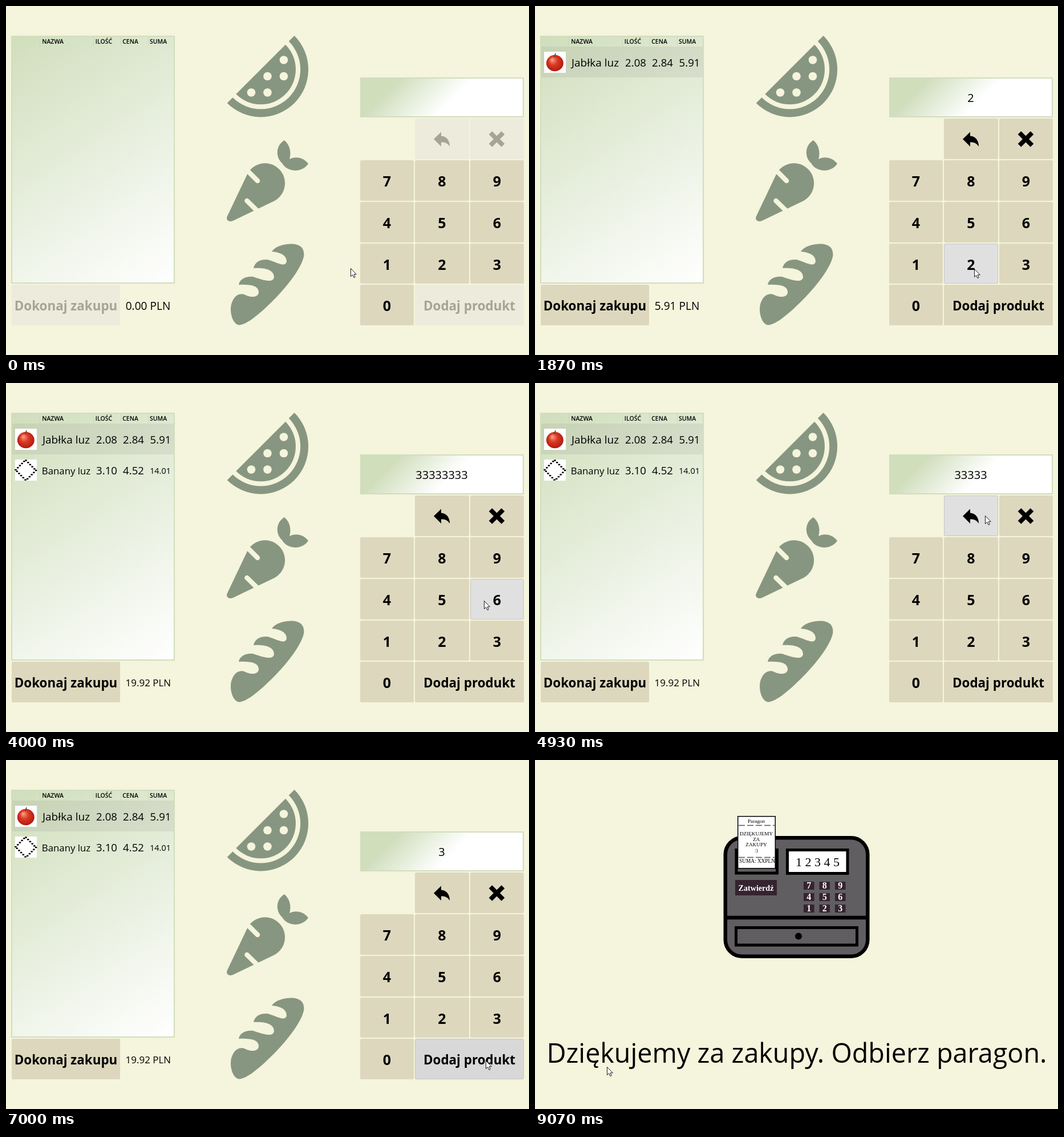
An HTML page with a canvas for the animation above (9600 ms loop, 917 by 611 pixels).

```html
<!DOCTYPE html>
<html lang="pl">
<head>
<meta charset="utf-8">
<title>Kasa samoobsługowa</title>
<style>
html, body { margin: 0; width: 100%; height: 100%; overflow: hidden; background: #f5f4dc; }
canvas { display: block; }
</style>
</head>
<body>
<canvas id="stage" width="917" height="611"></canvas>
<script>
const ctx = document.getElementById('stage').getContext('2d');
const LOOP = 9600, STEP = 1000 / 15, THANKS = 9000;
const SANS = '"Open Sans", "Noto Sans", sans-serif';
const SERIF = '"Liberation Serif", "Noto Serif", serif';
const BG = '#f5f4dc', GREEN = '#d0debc', LEAF = '#879680', KEY = '#ddd8bd', PALE = '#ecebdc';
const FADED = '#a4a597', HOVER = '#e0e0e0', PRESSED = '#d8d8d8', PLUM = '#35232f';

// Cursor stops: time, x, y
const moves = [
  [0, 604, 459], [67, 604, 459], [333, 671, 456], [800, 671, 456], [1200, 768, 515],
  [1400, 768, 515], [1735, 770, 460], [1870, 770, 460], [2133, 790, 512], [2270, 790, 512],
  [2735, 867, 466], [3270, 867, 466], [3335, 866, 465], [3735, 866, 465], [4400, 787, 231],
  [4530, 787, 231], [4870, 789, 232], [4935, 789, 232], [5133, 852, 236], [5600, 852, 236],
  [6000, 852, 284], [6270, 858, 458], [6335, 858, 458], [6600, 846, 520], [6935, 841, 526],
  [7000, 841, 526], [7600, 140, 536], [7733, 126, 536], [7925, 126, 536], [7930, 135, 534],
  [8266, 135, 534], [8400, 131, 530], [9060, 131, 530], [9066, 126, 537]
];

// Contents of the code field
const entries = [
  [0, ''], [730, '1'], [1400, ''], [1800, '2'], [2270, ''], [2800, '3'], [2930, '33'],
  [3070, '333'], [3200, '3333'], [3270, '33333'], [3470, '333333'], [3600, '3333333'],
  [3730, '33333333'], [4530, '3333333'], [4730, '333333'], [4930, '33333'],
  [5670, ''], [6330, '3'], [7070, '']
];

const COLS = [621, 717, 814], ROWS = [197, 270, 343, 416, 488];
const buttons = [];
'789456123'.split('').forEach((label, i) => addButton(label, COLS[i % 3], ROWS[1 + Math.floor(i / 3)]));
addButton('0', COLS[0], ROWS[4]);
addButton('undo', COLS[1], ROWS[0], 95, 'typed');
addButton('clear', COLS[2], ROWS[0], 94, 'typed');
addButton('Dodaj produkt', COLS[1], ROWS[4], 191, 'typed');
addButton('Dokonaj zakupu', 10, ROWS[4], 190, 'filled');

function addButton(label, x, y, w = x === COLS[1] ? 95 : 94, needs = '') {
  buttons.push({ label, x, y, w, h: y === ROWS[3] ? 70 : 71, needs });
}

function cursorAt(t) {
  const i = moves.findIndex(m => m[0] > t);
  if (i < 0) return moves[moves.length - 1].slice(1);
  const [t0, x0, y0] = moves[i - 1], [t1, x1, y1] = moves[i];
  const u = (t - t0) / (t1 - t0), k = u * u * (3 - 2 * u);
  return [x0 + (x1 - x0) * k, y0 + (y1 - y0) * k];
}

function entryAt(t) {
  let value = '';
  for (const [at, text] of entries) if (t >= at) value = text;
  return value;
}

function rect(x, y, w, h, fill) {
  ctx.fillStyle = fill;
  ctx.fillRect(x, y, w, h);
}

function frame(x, y, w, h, color, width) {
  ctx.strokeStyle = color;
  ctx.lineWidth = width;
  ctx.strokeRect(x, y, w, h);
}

function disc(x, y, r, fill) {
  ctx.fillStyle = fill;
  ctx.beginPath();
  ctx.arc(x, y, r, 0, 7);
  ctx.fill();
}

function line(x0, y0, x1, y1, color, width, cap = 'butt') {
  ctx.strokeStyle = color;
  ctx.lineWidth = width;
  ctx.lineCap = cap;
  ctx.beginPath();
  ctx.moveTo(x0, y0);
  ctx.lineTo(x1, y1);
  ctx.stroke();
}

function text(str, x, y, size, color = '#000', font = SANS, weight = 400) {
  ctx.font = `${weight} ${size}px ${font}`;
  ctx.textAlign = 'center';
  ctx.fillStyle = color;
  ctx.fillText(str, x, y);
}

function gradient(x0, y0, x1, y1, ...stops) {
  const g = ctx.createLinearGradient(x0, y0, x1, y1);
  stops.forEach(([at, color]) => g.addColorStop(at, color));
  return g;
}

const shape = d => new Path2D(d);
const LEAVES = shape('M488 235C472 245 473 265 484 275C492 290 518 294 530 276C521 264 506 263 497 268C501 256 497 242 488 235Z');
const CARROT = shape('M388 368L424 292.5A35 35 0 1 1 471 341L398 376C390 379 385 374 388 368Z');
const BREAD = shape('M397 517C402 505 412 502 420 506C432 512 444 509 443 500C442 490 430 487 408 488C410 478 420 473 433 474' +
  'C446 478 468 487 470 475C470 462 455 458 434 459C436 449 445 443 458 444C470 446 490 460 492 447C492 436 480 431 466 430' +
  'C472 420 490 416 503 416.5C517 418 522.5 424 522.5 436C520 456 495 488 473 511C453 531 427 556 410 558.5C396 559 390 530 397 517Z');
const UNDO = shape('M750 233L763 220.5V227.5C773 228 778 236 778 246C774 240 770 238.5 763 238.5V246Z');
const POINTER = shape('M.5 .5V14.5L3.7 11.5L6 16.5L8.2 15.5L6 10.8H10.3Z');

function drawMelon() {
  const a = -Math.PI / 4, b = a + Math.PI;
  ctx.fillStyle = LEAF;
  ctx.beginPath();
  ctx.arc(446.7, 111, 83.4, a, b);
  ctx.arc(446.7, 111, 69.5, b, a, true);
  ctx.fill();
  ctx.beginPath();
  ctx.arc(446.7, 111, 61.3, a, b);
  ctx.fill();
  for (const [c, r] of [[2, 0], [1, 1], [2, 1], [0, 2], [1, 2]]) {
    disc(430 + c * 28.5, 94.5 + r * 28.5, 7.3, BG);
  }
}

function drawPictures() {
  drawMelon();
  ctx.fillStyle = LEAF;
  ctx.fill(LEAVES);
  ctx.fill(CARROT);
  ctx.fill(BREAD);
  line(420, 285, 441, 306, BG, 8.5, 'round');
  line(422.5, 341, 441, 359, BG, 8.5, 'round');
}

function drawApple() {
  rect(16, 80, 38, 37, '#fff');
  const g = ctx.createRadialGradient(30, 94, 1, 35, 99, 17);
  [[0, '#f59a80'], [0.4, '#dd3a24'], [1, '#a8160f']].forEach(s => g.addColorStop(...s));
  ctx.fillStyle = g;
  ctx.beginPath();
  ctx.ellipse(34.8, 100, 15, 14.3, 0, 0, 7);
  ctx.fill();
  line(34, 89, 36, 83, '#5b3a1e', 1.6);
}

function drawDiamond() {
  rect(16, 134, 38, 37, '#fff');
  for (let i = 0; i < 5; i++) {
    const d = i * 3.7;
    for (const [x, y] of [[35 + d, 135.5 + d], [52.5 - d, 153 + d], [34 - d, 169.5 - d], [17 + d, 152 - d]]) {
      rect(x - 1.7, y - 1.2, 3.4, 2.4, '#000');
    }
  }
}

function drawList(t) {
  rect(10, 53, 285, 432, gradient(10, 53, 295, 485, [0, GREEN], [1, '#fff']));
  [59, 153, 201, 249].forEach(x => rect(x, 54, 1, 17, 'rgba(190,205,180,.5)'));
  [['NAZWA', 82], ['ILOŚĆ', 171.5], ['CENA', 218], ['SUMA', 267]]
    .forEach(([label, x]) => text(label, x, 66, 10.5, '#000', SANS, 600));
  if (t >= 1400) {
    rect(11, 71, 284, 54, 'rgba(120,116,116,.12)');
    drawApple();
    text('Jabłka luz', 105.5, 106, 19);
    [['2.08', 176.5], ['2.84', 223.5], ['5.91', 271]].forEach(([n, x]) => text(n, x, 106, 18.6));
  }
  if (t >= 2270) {
    drawDiamond();
    text('Banany luz', 105.5, 159.5, 16.8);
    text('3.10', 176.5, 160, 18.6);
    text('4.52', 223.5, 160, 18.6);
    text('14.01', 270.5, 158.5, 14.4);
  }
  frame(10, 53, 285, 432, GREEN, 2);
  if (t < 2270) text(t < 1400 ? '0.00 PLN' : '5.91 PLN', 249, 532, 19.1);
  else text('19.92 PLN', 249.3, 531, 17);
}

function drawField(value) {
  rect(621, 125, 287, 70, gradient(621, 125, 799.5, 303.5, [0.2, GREEN], [0.56, '#fff']));
  frame(622, 126, 285, 68, GREEN, 2);
  text(value, 764, 168, 20);
}

function drawButton(b, t, value, [cx, cy]) {
  const enabled = !b.needs || (b.needs === 'typed' ? value !== '' : t >= 1400);
  const over = enabled && cx >= b.x && cx < b.x + b.w && cy >= b.y && cy < b.y + b.h;
  const down = t >= 6930 && t < 7070 || t >= 7930;
  const ink = enabled ? '#000' : FADED;
  ctx.fillStyle = !enabled ? PALE : over ? (down ? PRESSED : HOVER) : KEY;
  ctx.beginPath();
  ctx.roundRect(b.x, b.y, b.w, b.h, 2.5);
  ctx.fill();
  if (over) {
    ctx.strokeStyle = '#c6c6c6';
    ctx.lineWidth = 1;
    ctx.beginPath();
    ctx.roundRect(b.x + 0.5, b.y + 0.5, b.w - 1, b.h - 1, 2.5);
    ctx.stroke();
  }
  const mid = b.x + b.w / 2;
  if (b.label === 'undo') {
    ctx.fillStyle = ink;
    ctx.fill(UNDO);
  } else if (b.label === 'clear') {
    line(849.5, 222, 871.5, 244, ink, 8);
    line(871.5, 222, 849.5, 244, ink, 8);
  } else if (b.label.length > 1) {
    text(b.label, mid, 533, 22.4, ink, SANS, 700);
  } else {
    text(b.label, mid, b.y + 45.5, 25, ink, SANS, 700);
  }
}

function drawShop(t, cursor) {
  const value = entryAt(t);
  drawList(t);
  drawPictures();
  drawField(value);
  buttons.forEach(b => drawButton(b, t, value, cursor));
}

function drawReceipt() {
  rect(355, 98, 67, 92, '#fff');
  frame(355.7, 98.7, 65.6, 91, '#000', 1.5);
  ctx.setLineDash([11, 4]);
  line(357, 114.5, 420, 114.5, '#555', 1.3);
  line(357, 170.5, 420, 170.5, '#555', 1.3);
  ctx.setLineDash([]);
  [['Paragon', 110], ['DZIĘKUJEMY', 132], ['ZA', 141.5], ['ZAKUPY', 151], [':)', 160.5]]
    .forEach(([s, y]) => text(s, 388, y, 9.2, '#000', SERIF));
  text('SUMA: XXPLN', 389.5, 179.5, 9.3, '#000', SERIF);
}

function drawThanks() {
  ctx.fillStyle = '#605e60';
  ctx.strokeStyle = '#000';
  ctx.lineWidth = 6.5;
  ctx.beginPath();
  ctx.roundRect(333.8, 136.3, 249.5, 207.5, 29);
  ctx.fill();
  ctx.stroke();
  line(334, 276, 583, 276, '#000', 6.5);
  frame(352.5, 293.5, 212, 30.5, '#000', 5);
  disc(462, 308.5, 6, '#000');
  frame(353, 157.5, 71.5, 40.5, '#000', 5);
  rect(442, 157, 106, 41, '#fff');
  frame(442.5, 157.5, 105.5, 41, '#000', 5);
  text('1 2 3 4 5', 495.5, 186, 22, '#000', SERIF);
  drawReceipt();
  rect(351, 210, 73, 27, PLUM);
  text('Zatwierdź', 387.5, 228.5, 14.1, '#fff', SERIF, 700);
  '789456123'.split('').forEach((n, i) => {
    const x = 471 + (i % 3) * 27.5, y = 213 + Math.floor(i / 3) * 20;
    rect(x, y, 18.5, 14, PLUM);
    text(n, x + 9.2, y + 12, 16, '#fff', SERIF, 700);
  });
  text('Dziękujemy za zakupy. Odbierz paragon.', 459, 530, 46.7);
}

function drawPointer([x, y]) {
  ctx.save();
  ctx.translate(Math.round(x), Math.round(y));
  ctx.fillStyle = '#fff';
  ctx.strokeStyle = '#1a1a2a';
  ctx.lineWidth = 1;
  ctx.fill(POINTER);
  ctx.stroke(POINTER);
  ctx.restore();
}

function render(ms) {
  const t = Math.floor((ms % LOOP + 4) / STEP) * STEP + 4;
  const cursor = cursorAt(t);
  rect(0, 0, 917, 611, BG);
  if (t >= THANKS) drawThanks();
  else drawShop(t, cursor);
  drawPointer(cursor);
}

const start = performance.now();
function tick() {
  render(performance.now() - start);
  requestAnimationFrame(tick);
}
tick();
</script>
</body>
</html>
```
